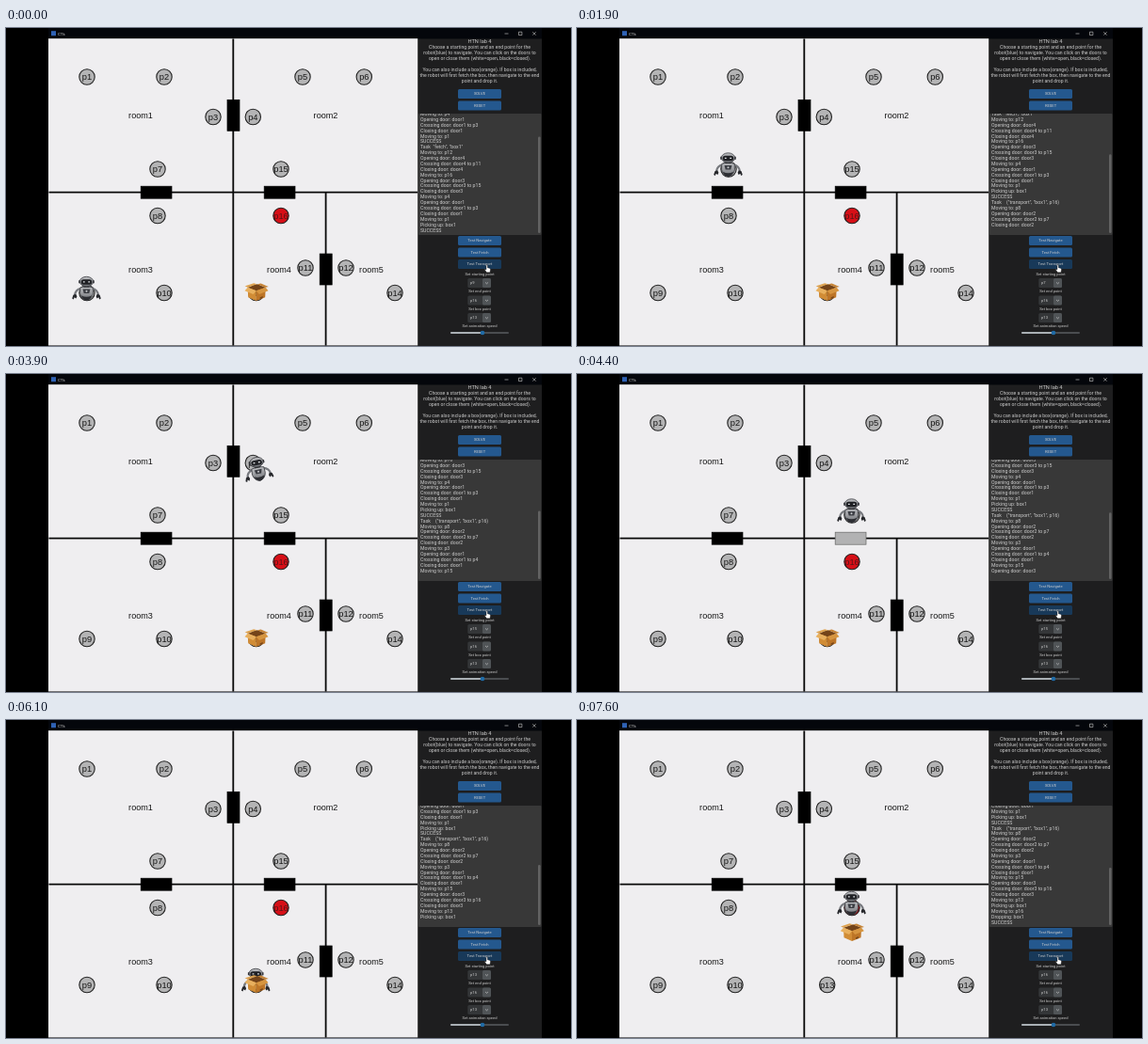
These frames come from a looping animation (600x338 px, 8.6 s). An HTML page:

```html
<!DOCTYPE html>
<html lang="en">
<head>
<meta charset="utf-8">
<title>HTN lab 4</title>
<style>
  html, body { margin: 0; width: 100%; height: 100%; overflow: hidden; background: #000; }
  svg { display: block; width: 100vw; height: 100vh; }
  text { font-family: Roboto, Arial, sans-serif; fill: #cdcdcd; white-space: pre; }
  .map text { font-family: "Liberation Sans", Arial, sans-serif; fill: #161616; }
</style>
</head>
<body>
<svg id="stage" viewBox="0 0 600 338" preserveAspectRatio="none">
  <defs>
    <clipPath id="logClip"><rect x="438" y="91" width="127" height="129"/></clipPath>
    <linearGradient id="shell" x2="0" y2="1">
      <stop offset="0" stop-color="#c2c3c6"/><stop offset="1" stop-color="#6e7075"/>
    </linearGradient>
    <g id="robotArt">
      <path d="M-6-1.5C-10-.5-12 2-12.5 5.5M6-1.5C10-.5 12 2 12.5 5.5" fill="none" stroke="#77797e" stroke-width="2.2"/>
      <path d="M-11.3 4.5l-2.8 1-1.2 3.6 1.6 1 .8-2.2 1.8 1.4 1-2.4zM11.3 4.5l2.8 1 1.2 3.6-1.6 1-.8-2.2-1.8 1.4-1-2.4z" fill="#25262a"/>
      <path d="M-6.6-2.5Q0-5 6.6-2.5L7 3.5Q6 10 0 11.2Q-6 10-7 3.5Z" fill="url(#shell)" stroke="#3c3d42" stroke-width=".8"/>
      <path d="M-5.6 6Q0 9 5.6 6Q4 11 0 11.2Q-4 11-5.6 6Z" fill="#2c2d32"/>
      <path d="M-4-.8H4L2.8 3.6H-2.8Z" fill="#3b3d43"/>
      <circle cy="1.4" r="1" fill="#c9cace"/>
      <rect x="-3" y="-5.2" width="6" height="2.6" fill="#292a2e"/>
      <ellipse cy="-8.8" rx="7.2" ry="5.2" fill="url(#shell)" stroke="#3c3d42" stroke-width=".8"/>
      <path d="M-7.6-10v3M7.6-10v3" stroke="#303136" stroke-width="1.4"/>
      <rect x="-5.8" y="-11" width="11.6" height="5.4" rx="2.7" fill="#1f2024"/>
      <path d="M-3.6-8.4h1.8M1.8-8.4h1.8" stroke="#dadce0" stroke-width="1.4"/>
    </g>
    <g id="boxArt" transform="translate(0 -.8)">
      <path d="M-9-5L1-8.5 10-5 0-1Z" fill="#744419"/>
      <path d="M-9-5L0-1.5V9.3L-8.5 5.5Z" fill="#d18c35"/>
      <path d="M10-5L0-1.5V9.3L9.5 5.5Z" fill="#bd7527"/>
      <path d="M-9-5L1-8.5-2.5-9.5-12-6.3Z" fill="#dda250"/>
      <path d="M10-5L1-8.5 5-9.3 13-5.8Z" fill="#c58335"/>
      <path d="M-9-5L0-1.5-3 2.2-12.2-1.5Z" fill="#e8b05e"/>
      <path d="M10-5L0-1.5 3.2 2.2 12.8-1.5Z" fill="#d69540"/>
      <path d="M4 5.6l3-1.2v1.8l-3 1.2z" fill="#7b4819"/>
    </g>
  </defs>
</svg>
<script>
const LOOP = 8600, STEP = 100, TILT = 11;
const stage = document.getElementById("stage");

function add(parent, tag, attrs = {}, content = "") {
  const el = document.createElementNS("http://www.w3.org/2000/svg", tag);
  for (const key in attrs) el.setAttribute(key, attrs[key]);
  el.textContent = content;
  parent.append(el);
  return el;
}
const rect = (parent, x, y, width, height, fill, extra) =>
  add(parent, "rect", { x, y, width, height, fill, ...extra });
const label = (parent, x, cy, size, content, anchor = "middle") =>
  add(parent, "text", { x, y: cy + size * .35, "font-size": size, "text-anchor": anchor }, content);

const nodes = {
  p1: [86, 52], p2: [168, 52], p3: [220, 94.5], p4: [262.3, 94.5],
  p5: [315, 52], p6: [380.3, 52], p7: [161, 150], p8: [161, 199.5],
  p9: [86, 281.5], p10: [168, 281.5], p11: [318, 255], p12: [361, 255],
  p13: [265.7, 281.5], p14: [413, 281.5], p15: [292, 150], p16: [292, 199.5]
};
const rooms = [[143, 93], [339.5, 93], [143, 257], [290, 257], [388, 257]];

// Window frame
rect(stage, 45, 0, 524, 338, "#1e1e1f");
rect(stage, 45, 0, 524, 11.5, "#04060b");
rect(stage, 48, 3.2, 5, 5, "#2f62b5");
label(stage, 55, 6, 4.4, "CTk", "start");
add(stage, "path", {
  d: "M529.5 6h4M544.5 4.2h3.4v3.4h-3.4zM559.3 4.2l3.4 3.4m0-3.4l-3.4 3.4",
  fill: "none", stroke: "#d0d0d0", "stroke-width": .6
});

// Map
const map = add(stage, "g", { class: "map" });
rect(map, 45, 11.2, 392.2, 326.2, "#efeef0");
add(map, "path", { d: "M241.3 11.5V337.4M45.5 174.6H437M339.6 174.6V337.4", stroke: "#080808", "stroke-width": 1.8 });
const doors = [[235, 76.3, 13, 33], [143.2, 168.2, 32.8, 13], [274.2, 168.2, 32.8, 13], [333.2, 240, 13, 33]]
  .map(box => rect(map, ...box, "#000", { stroke: "#000", "stroke-width": .7 }));
rooms.forEach(([x, y], i) => label(map, x, y, 9.1, "room" + (i + 1)));
for (const name in nodes) {
  const [cx, cy] = nodes[name];
  const isGoal = name === "p16";
  add(map, "circle", { cx, cy, r: 8.2, fill: isGoal ? "#d60f17" : "#b4b4b5", stroke: "#222", "stroke-width": 1.1 });
  label(map, cx, cy, 9.3, name).style.opacity = isGoal ? .65 : 1;
}
const robot = add(map, "use", { href: "#robotArt" });
const carton = add(map, "use", { href: "#boxArt" });

// Side panel
label(stage, 503, 14, 5.7, "HTN lab 4");
["Choose a starting point and an end point for the",
 "robot(blue) to navigate. You can click on the doors to",
 "open or close them (white=open, black=closed).", "",
 "You can also include a box(orange). If box is included,",
 "the robot will first fetch the box, then navigate to the end",
 "point and drop it."].forEach((line, i) => label(stage, 503, 19.8 + i * 6, 5.1, line));

function button(cy, caption, fill = "#24588e") {
  rect(stage, 480, cy - 5, 46, 10, fill, { rx: 1.5 });
  label(stage, 503, cy, 4.15, caption);
}
button(70, "SOLVE");
button(82.4, "RESET");
button(226, "Test Navigate");
button(238.5, "Test Fetch");
button(251, "Test Transport", "#183959");

function dropdown(cy, title, value) {
  label(stage, 503, cy - 9.5, 4.05, title);
  rect(stage, 490.3, cy - 5, 24.7, 10, "#343638", { rx: 1.5 });
  rect(stage, 506, cy - 5, 9, 10, "#505457", { rx: 1.5 });
  add(stage, "path", { d: `M509 ${cy - .6}l1.5 1.4 1.5-1.4`, fill: "none", stroke: "#ddd", "stroke-width": .6 });
  return label(stage, 493, cy, 4.15, value, "start");
}
const startValue = dropdown(271, "Set starting point", "p9");
dropdown(289.5, "Set end point", "p16");
dropdown(308, "Set box point", "p13");
label(stage, 503, 317, 4.05, "Set animation speed");
rect(stage, 472, 323, 62, 2, "#4a4d50", { rx: 1 });
rect(stage, 472, 323, 34, 2, "#aab0b5", { rx: 1 });
add(stage, "circle", { cx: 506, cy: 324, r: 2.3, fill: "#1f6aa5" });

rect(stage, 438, 91, 130.5, 129, "#383838", { rx: 1 });
const thumb = rect(stage, 565, 0, 2.6, 0, "#626262", { rx: 1.3 });
const logGroup = add(stage, "g", { "clip-path": "url(#logClip)" });
const logRows = Array.from({ length: 22 }, (_, i) => label(logGroup, 440, 91.2 + i * 5.88, 5.2, "", "start"));

add(stage, "path", {
  d: "M510 252.2q.8-.8 1.4 0v2.6l2.4.6q.8.3.7 1.2l-.5 3.2h-3.6l-2-2.8q.2-1 1.6-.2z",
  fill: "#fff", stroke: "#111", "stroke-width": .4
});

// Story: [time, log line]
const move = to => "Moving to: " + to;
const opening = n => "Opening door: door" + n;
const crossing = (n, to) => `Crossing door: door${n} to ${to}`;
const closing = n => "Closing door: door" + n;
const pass = (n, to) => [opening(n), crossing(n, to), closing(n)];

const history = [
  move("p4"), ...pass(1, "p3"), move("p1"), "SUCCESS", 'Task  "fetch", "box1"',
  move("p12"), ...pass(4, "p11"), move("p16"), ...pass(3, "p15"),
  move("p4"), ...pass(1, "p3"), move("p1"), "Picking up: box1", "SUCCESS"
];
const events = [
  [100, 'Task    ("transport", "box1", p16)'], [100, move("p8")],
  [900, opening(2)], [1300, crossing(2, "p7")], [1700, closing(2)],
  [2100, move("p3")], [2600, opening(1)], [3000, crossing(1, "p4")], [3400, closing(1)],
  [3900, move("p15")], [4400, opening(3)], [4800, crossing(3, "p16")], [5200, closing(3)],
  [5500, move("p13")], [6100, "Picking up: box1"], [6500, move("p16")],
  [7300, "Dropping: box1"], [7600, "SUCCESS"]
];
// [from, to, start, end]
const moves = [
  ["p9", "p8", 0, 800], ["p8", "p7", 1200, 1600], ["p7", "p3", 2000, 2600],
  ["p3", "p4", 2900, 3200], ["p4", "p15", 3800, 4300], ["p15", "p16", 4700, 5100],
  ["p16", "p13", 5400, 6000], ["p13", "p16", 6400, 7200]
];
const openTimes = [[2600, 3400], [900, 1700], [4400, 5200], [0, 0]];
const PICK = 6100, DROP = 7300;

function place(el, x, y, angle = 0) {
  el.setAttribute("transform", `translate(${x} ${y}) rotate(${angle})`);
}

function drawLog(t) {
  const lines = history.concat(events.filter(([at]) => t >= at).map(([, line]) => line));
  const blank = lines.at(-1) === "SUCCESS" ? 0 : 1;
  const first = lines.length + blank - logRows.length;
  logRows.forEach((row, i) => row.textContent = lines[first + i] ?? "");
  const top = 92 + 127 * (1 - 22 / (lines.length + blank + 5));
  thumb.setAttribute("y", top);
  thumb.setAttribute("height", 218 - top);
}

function render(t) {
  const [from, to, start, end] = moves.findLast(m => t > m[2]) ?? ["p9", "p9", 0, 1];
  const k = Math.min(1, (t - start) / (end - start));
  const [x, y] = nodes[from].map((v, i) => v + (nodes[to][i] - v) * k);
  // The robot waddles from side to side while it walks
  const side = Math.round((t - start) / STEP) % 2 ? -1 : 1;
  place(robot, x - .5, y - 3.2, t > start && t < end ? side * TILT : 0);
  if (t < PICK) place(carton, ...nodes.p13);
  else place(carton, x, t < DROP ? y : y + 27);
  doors.forEach((door, i) => {
    const open = t >= openTimes[i][0] && t < openTimes[i][1];
    door.setAttribute("fill", open ? "#b2b2b3" : "#000");
    door.setAttribute("stroke", open ? "#666" : "#000");
  });
  startValue.textContent = to;
  drawLog(t);
}

const origin = performance.now();
function tick() {
  const t = (performance.now() - origin) % LOOP;
  render(Math.floor(t / STEP) * STEP);
  requestAnimationFrame(tick);
}
tick();
</script>
</body>
</html>
```
